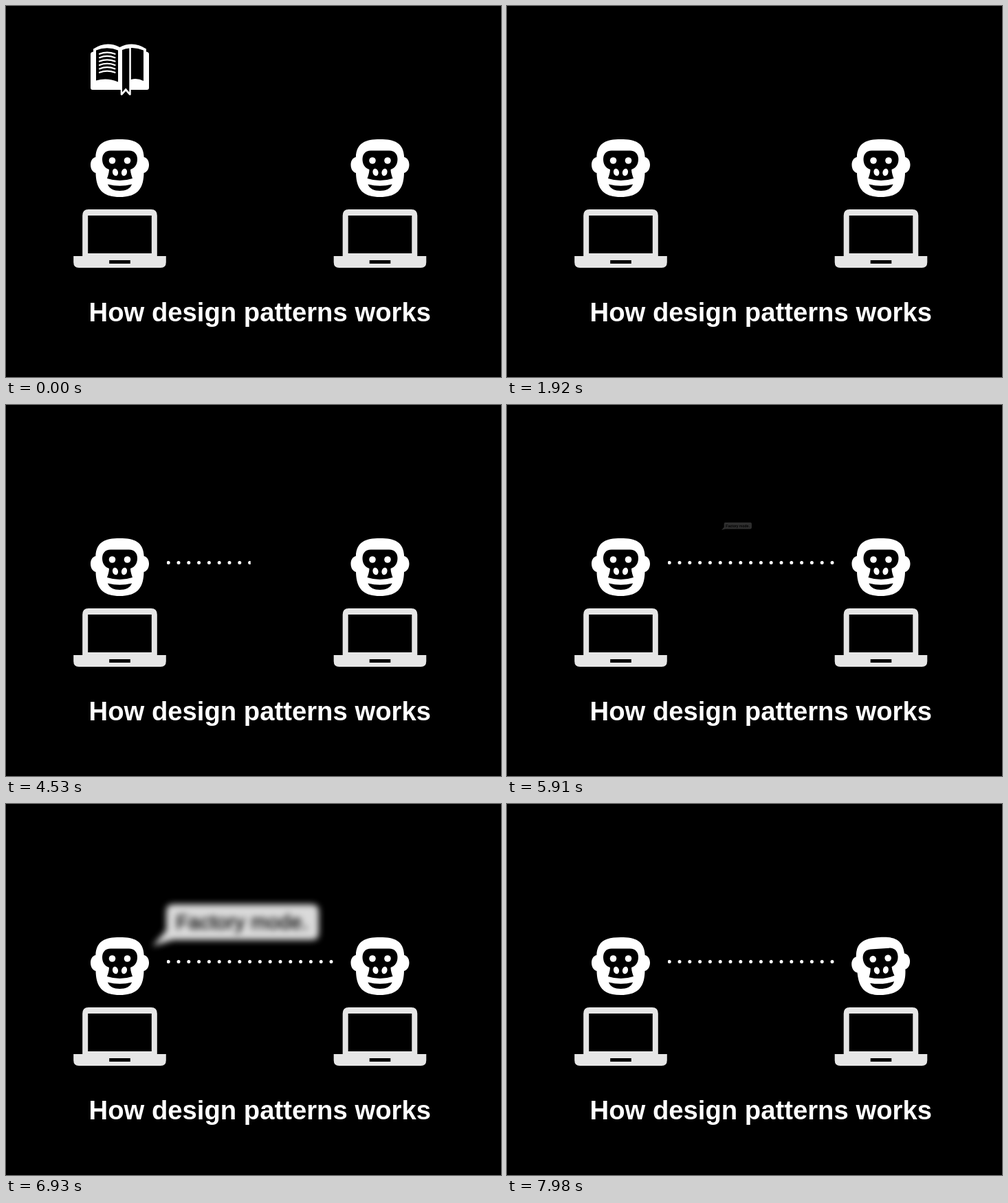
Animation of 720x540 px, one loop 8000 ms. Source, as an HTML page:

```html
<!DOCTYPE html>
<html lang="en">
<head>
<meta charset="utf-8">
<title>How design patterns works</title>
<style>
  html, body { margin: 0; width: 100%; height: 100%; overflow: hidden; background: #000; }
  svg { display: block; width: 100vw; height: 100vh; }
  text { font-family: "Liberation Sans", Arial, sans-serif; }
</style>
</head>
<body>
<svg viewBox="0 0 720 540" fill="#fff">
  <defs>
    <g id="head">
      <path d="M165.5 194C187 194 199.5 199 200.7 220C205.5 221 208 226 208 231C208 237 205 242 200.5 243C200 264 193 278 165.5 278C138 278 131 264 130.5 243C126 242 123 237 123 231C123 226 125.5 221 130.3 220C131.5 199 144 194 165.5 194Z"/>
      <g fill="#000">
        <path d="M152 210.5H179C187 210.5 191 216 191 223C191 231 187 236 181 238C181 243 183 248 184 251Q165.5 257 147 251C148 248 150 243 150 238C144 236 140 231 140 223C140 216 144 210.5 152 210.5Z"/>
        <path d="M148 259.5Q165.5 264 183 259.5C181 266 174 269 165.5 269C157 269 150 266 148 259.5Z"/>
      </g>
      <circle cx="154.5" cy="225" r="4.8"/>
      <circle cx="176.5" cy="225" r="4.8"/>
      <ellipse cx="159" cy="242" rx="4" ry="5.3" transform="rotate(-14 159 242)"/>
      <ellipse cx="172" cy="242" rx="4" ry="5.3" transform="rotate(14 172 242)"/>
    </g>
    <g id="laptop" fill="#e6e6e6">
      <path fill-rule="evenodd" d="M98.2 364H111.2V305Q111.2 296 120 296H211Q219.8 296 219.8 305V364H232.8V373Q232.8 381 225 381H106Q98.2 381 98.2 373ZM119.2 305V360H211.8V305ZM150.2 370V375H180.8V370Z"/>
    </g>
    <clipPath id="wipe"><rect id="wipeRect" x="234" y="220" width="0" height="20"/></clipPath>
  </defs>

  <use href="#laptop"/>
  <use href="#laptop" x="378.5"/>
  <g id="leftHead"><use href="#head"/></g>
  <g id="rightHead"><use href="#head" x="378.5"/></g>

  <g id="book">
    <path fill-rule="evenodd" d="M123 70Q123 67 127 66.5V62.5Q146 50 165.5 60Q185 50 204 62.5V66.5Q208 67 208 70V119Q208 122 205 122H181.7V129Q180.5 131 179 129.3L174.2 124L169.5 129.3Q168 131 166.7 129V122H126Q123 122 123 119ZM131 64.5V108.5Q147 103.5 163 110.5V64.5Q147 58 131 64.5ZM169 64V125.5L174.2 119.5L179.3 125.5V61.5Q174 61.5 169 64ZM181.8 61V107Q191 104.5 200 109V64.5Q191 60.5 181.8 61Z"/>
    <g id="lines" fill="none" stroke="#fff" stroke-width="2.2" stroke-linecap="round"></g>
  </g>

  <g clip-path="url(#wipe)">
    <path d="M236.2 229.5H474" fill="none" stroke="#fff" stroke-width="5" stroke-linecap="round" stroke-dasharray="0 14.8"/>
  </g>

  <g id="bubble">
    <path d="M243 146H445Q455 146 455 156V188Q455 198 445 198H243L213 207L233 184V156Q233 146 243 146Z"/>
    <text x="247.6" y="182.3" font-size="29" letter-spacing=".5" fill="#000" stroke="#000" stroke-width=".6">Factory mode.</text>
  </g>

  <text x="120.6" y="459" font-size="38.25" font-weight="bold">How design patterns works</text>
</svg>
<script>
  const LOOP = 8000;
  const el = id => document.getElementById(id);
  const progress = (t, start, duration) => Math.min(1, Math.max(0, (t - start) / duration));
  const smooth = u => u * u * (3 - 2 * u);
  const easeOut = u => 1 - (1 - u) ** 3;

  el("lines").innerHTML = Array.from({ length: 6 }, (_, i) => {
    const y = 69.8 + i * 5.4;
    return `<path d="M136 ${y}Q147 ${y - 4.5} 158.5 ${y}"/>`;
  }).join("");

  // Scale about (cx, cy), with that point moved down by dy.
  function place(node, cx, cy, scale, dy = 0) {
    node.setAttribute("transform",
      `translate(${cx} ${cy + dy}) scale(${scale}) translate(${-cx} ${-cy})`);
  }

  function show(node, opacity, blur) {
    node.style.display = opacity > 0 ? "" : "none";
    node.style.opacity = opacity;
    node.style.filter = blur > 0 ? `blur(${blur}px)` : "none";
  }

  function jiggle(node, cx, u) {
    const angle = -4.2 * Math.sin(2 * Math.PI * u);
    node.setAttribute("transform", `rotate(${angle} ${cx} 236)`);
  }

  function draw(t) {
    const drop = smooth(progress(t, 460, 860));
    const absorbed = progress(t, 1785, 150);
    place(el("book"), 165.5, 92.5, 1 - 0.75 * drop, 109 * drop);
    show(el("book"), 1 - absorbed, 10 * absorbed);

    jiggle(el("leftHead"), 165.5, progress(t, 2715, 450));
    jiggle(el("rightHead"), 544, progress(t, 7845, 450));

    el("wipeRect").setAttribute("width", 243 * smooth(progress(t, 3870, 1320)));

    const grow = easeOut(progress(t, 5878, 512));
    const leave = progress(t, 6855, 525);
    place(el("bubble"), 334, 176.5, grow);
    show(el("bubble"), grow * (1 - leave), 34 * leave);
  }

  const begin = performance.now();
  function frame() {
    draw((performance.now() - begin) % LOOP);
    requestAnimationFrame(frame);
  }
  frame();
</script>
</body>
</html>
```
